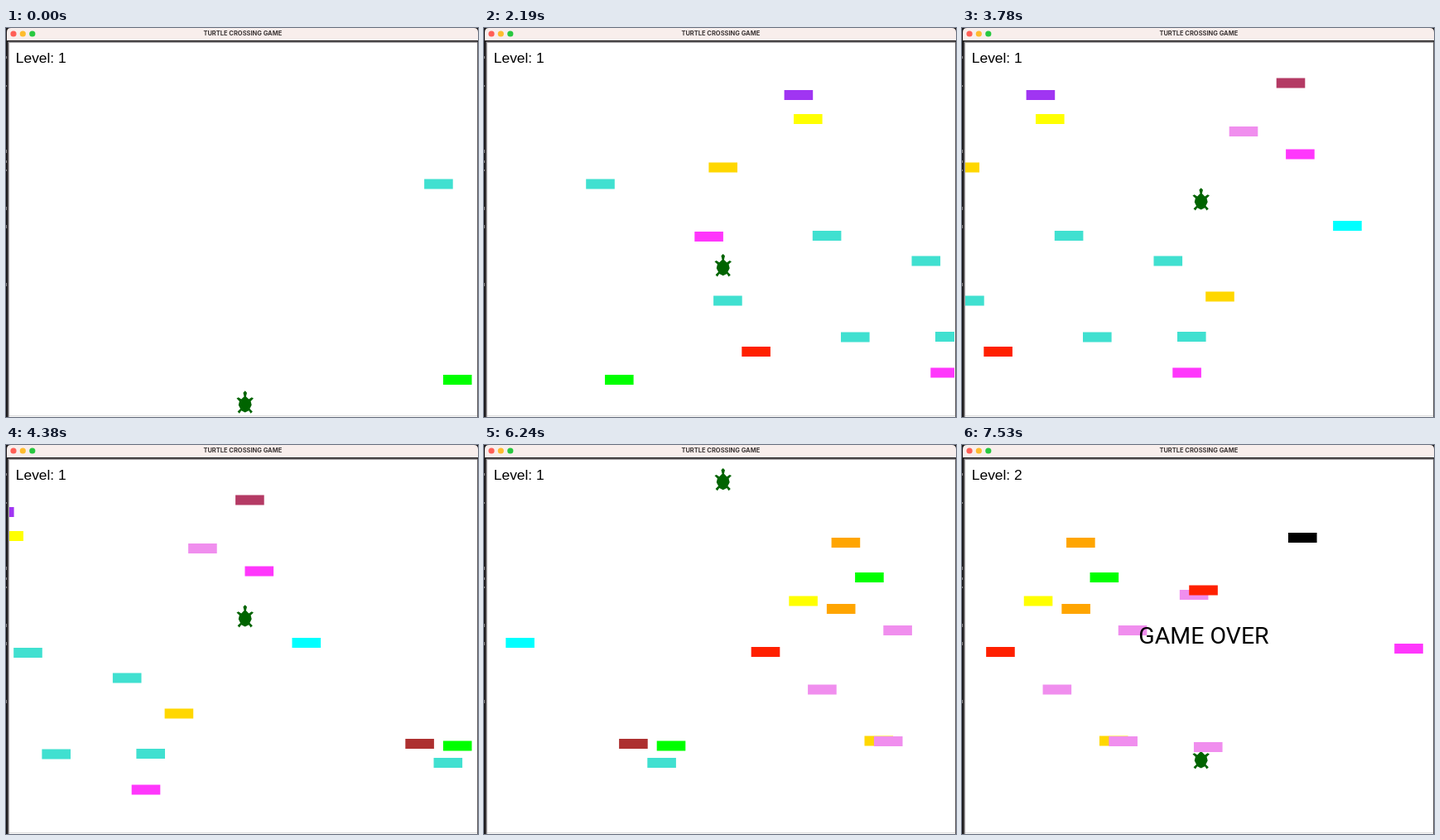
Animation, 570 px wide and 470 px high, one loop 8490 ms. Source, as an HTML page:

```html
<!DOCTYPE html>
<html lang="en">
<head>
<meta charset="utf-8">
<title>Turtle Crossing Game</title>
<style>
  html, body { margin: 0; width: 100%; height: 100%; overflow: hidden; background: #fff; }
  svg { display: block; width: 570px; height: 470px; }
  .title { font: 700 7.5px Inter, sans-serif; fill: #3c3636; text-anchor: middle; }
  .level { font: 17.4px "Liberation Sans", Arial, sans-serif; }
  .over { font: 28.5px Roboto, sans-serif; text-anchor: middle; }
</style>
</head>
<body>
<svg viewBox="0 0 570 470">
  <defs>
    <clipPath id="road"><rect x="4" y="18" width="564" height="450"/></clipPath>
  </defs>
  <rect width="570" height="470" fill="#1c1a1c"/>
  <path d="M0 34v3M0 69v2M0 147v4M0 160v3M0 171v2M0 216v4M0 238v4M0 308v4" stroke="#8a8788" stroke-width="2"/>
  <path d="M1 15V5q0-5 5-5H565q5 0 5 5V15Z" fill="#f8eeec"/>
  <circle cx="9" cy="7" r="3.6" fill="#ff5f57"/>
  <circle cx="20.3" cy="7" r="3.6" fill="#febc2e"/>
  <circle cx="31.8" cy="7" r="3.6" fill="#28c840"/>
  <text class="title" x="285.8" y="9.4">TURTLE CROSSING GAME</text>
  <rect x="2.5" y="16.5" width="567" height="454" fill="#a5a2a4"/>
  <rect x="4" y="18" width="565" height="452" fill="#fff"/>
  <path d="M4 468.7H569" stroke="#d6d6d6"/>
  <g clip-path="url(#road)">
    <path id="turtle" fill="#006400"/>
    <g id="cars"></g>
  </g>
  <text class="level" id="level" x="11.8" y="42">Level: 1</text>
  <text class="over" id="over" x="292" y="239.5">GAME OVER</text>
</svg>
<script>
const LOOP = 8490, TICK = 30, END = 7530;
const LEVEL_UP = 6703, LEVEL_STEP = 205;
const UNIT = 5.7, START_X = 556.4;

const colors = {
  turquoise: '#40e0d0', green: '#00ff00', gold: '#ffd700', magenta: '#ff37fc',
  red: '#ff2000', purple: '#a035f2', yellow: '#ffff00', maroon: '#b43a64',
  violet: '#f08eee', cyan: '#00ffff', brown: '#ad3030', orange: '#ffa500', black: '#000'
};

// color, travel at birth, centre y
const cars = [
  ['turquoise', -9, 188.5], ['green', -5, 425], ['magenta', 14, 252],
  ['gold', 17, 168.5], ['turquoise', 18, 329.5], ['red', 24, 391],
  ['purple', 33, 81], ['yellow', 35, 110], ['turquoise', 39, 251],
  ['turquoise', 45, 373.5], ['turquoise', 60, 281.5], ['magenta', 64, 416.5],
  ['turquoise', 65, 373], ['gold', 71, 324.5], ['violet', 76, 125],
  ['maroon', 86, 66.5], ['magenta', 88, 152.5], ['cyan', 98, 239],
  ['brown', 122, 361], ['turquoise', 128, 384], ['green', 130, 363.5],
  ['red', 150, 250], ['yellow', 158, 188.5], ['violet', 162, 295.5],
  ['orange', 166, 198], ['orange', 167, 118], ['green', 172, 160],
  ['gold', 174, 357.5], ['violet', 176, 358], ['violet', 178, 224],
  ['violet', 191, 181], ['red', 193, 175.5], ['violet', 194, 365],
  ['black', 214, 112], ['magenta', 236.5, 246]
];

// time, game steps done
const gameKeys = [[0, 0], [990, 30], [2190, 67], [3210, 99], [4380, 135],
  [6240, 191], [LEVEL_UP, LEVEL_STEP], [END, 230]];

// time, turtle steps from the start line
const turtleKeys = [[0, 0], [150, 0], [990, 14], [1890, 29], [2970, 29], [3210, 33],
  [3810, 43], [4440, 43], [6240, 72], [6360, 74], [LEVEL_UP, 74],
  [LEVEL_UP, 0], [6830, 0], [6990, 3], [END, 13]];

const $ = id => document.getElementById(id);

function stepAt(keys, t) {
  const i = keys.findIndex(k => k[0] > t);
  if (i < 0) return keys[keys.length - 1][1];
  const [t0, a] = keys[i - 1], [t1, b] = keys[i];
  return Math.round(a + (b - a) * (t - t0) / (t1 - t0));
}

// Right half of the turtle, nose to tail, mirrored for the left
const half = [[0, 16], [2, 14], [1, 10], [4, 7], [7, 9], [9, 8], [6, 5], [7, 1],
  [5, -3], [8, -6], [6, -8], [4, -5], [0, -7]];
const outline = [...half, ...half.slice(1, -1).reverse().map(([x, y]) => [-x, y])];
$('turtle').setAttribute('d', 'M' + outline.map(([x, y]) => `${x * 1.14} ${-y * 1.14}`).join('L') + 'Z');

const boxes = cars.map(([color, , y]) => {
  const box = document.createElementNS('http://www.w3.org/2000/svg', 'rect');
  const attrs = { y: y - 6, width: 34.6, height: 12, fill: colors[color] };
  for (const name in attrs) box.setAttribute(name, attrs[name]);
  $('cars').append(box);
  return box;
});

function draw(now) {
  const t = Math.floor(now % LOOP / TICK) * TICK;
  const step = stepAt(gameKeys, t);
  const travel = step + Math.max(0, step - LEVEL_STEP) * 0.5;

  boxes.forEach((box, i) => {
    const age = travel - cars[i][1];
    box.setAttribute('x', START_X - UNIT * age);
    box.setAttribute('visibility', age > 0 ? 'visible' : 'hidden');
  });
  const y = 456.6 - UNIT * stepAt(turtleKeys, t);
  $('turtle').setAttribute('transform', `translate(288.7 ${y})`);
  $('level').textContent = 'Level: ' + (t > LEVEL_UP ? 2 : 1);
  $('over').setAttribute('visibility', t >= END ? 'visible' : 'hidden');
}

function loop() {
  draw(performance.now());
  requestAnimationFrame(loop);
}
loop();
</script>
</body>
</html>
```
